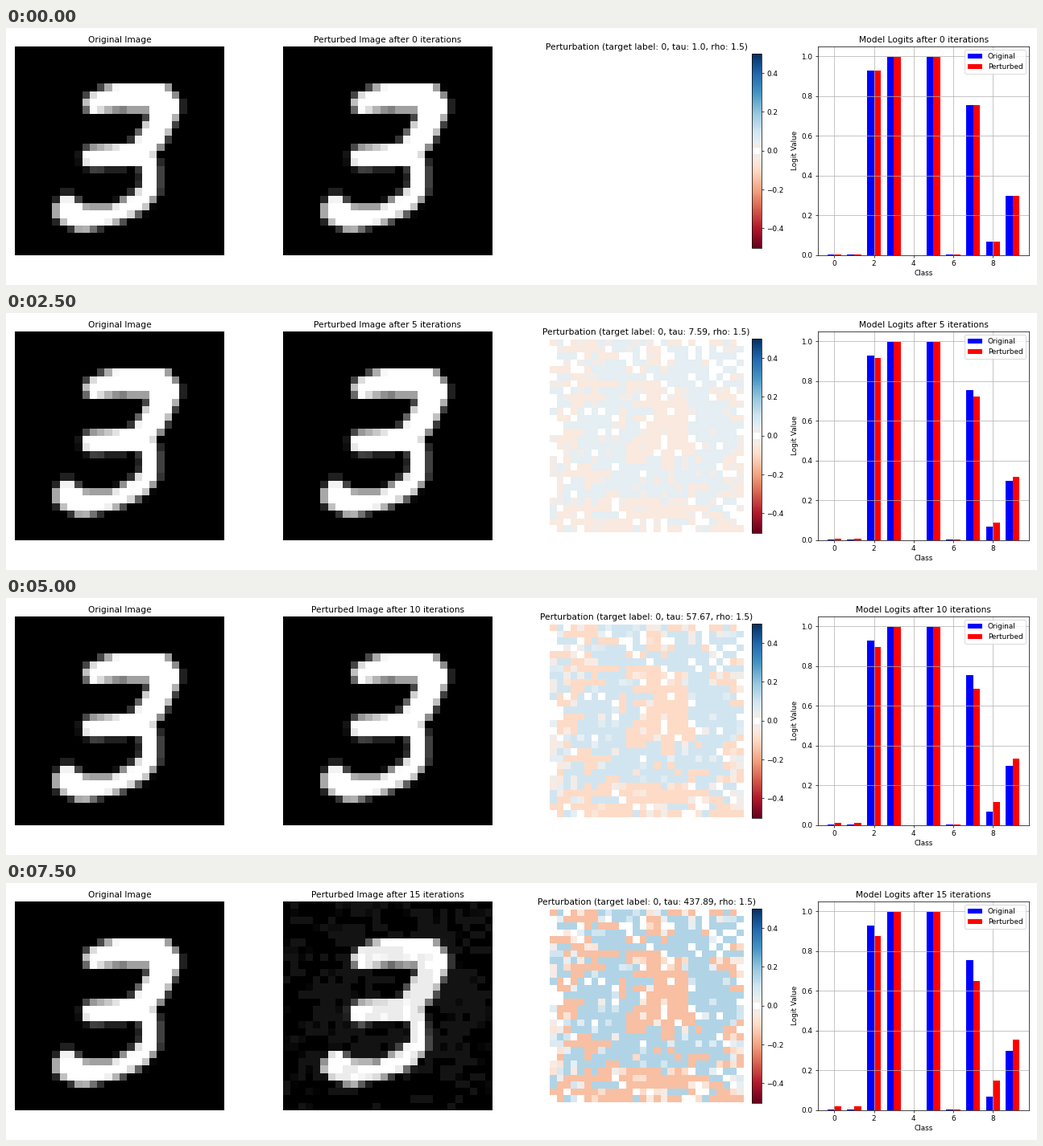
Write a matplotlib script that moves like this. It is 1280 px wide and 320 px high and loops after 8 s.

```python
import numpy as np
import matplotlib.pyplot as plt
from matplotlib.animation import FuncAnimation
from matplotlib.colors import ListedColormap

DPI = 64
STEPS, N = 16, 28
RHO, STEP = 1.5, 0.01

# Pen strokes of the digit in grid cells: x, y, pen radius
UPPER = [(10.6, 7.6, 1.4), (13.5, 6.8, 1.75), (19.5, 6.8, 1.8), (20.2, 8, 2),
         (19.6, 9.8, 1.8), (18.4, 12.1, 1.8), (16.5, 14.4, 1.6), (10.25, 14.85, 1.4)]
LOWER = [(16.9, 14.2, 1.7), (18.1, 16, 1.2), (18.1, 19.2, 1.2), (16.6, 20.8, 1.4),
         (13.4, 22.5, 1.2), (9, 23.1, 1.65), (7.1, 22, 1.85), (7, 20.9, 1.15)]

LOGITS = np.array([0.004, 0.003, 0.93, 0.998, 1e-6, 0.998, 5e-4, 0.754, 0.067, 0.299])
RATES = np.array([0.105, 0.117, -0.043, 0, 0, 0, 0.139, -0.033, 0.059, 0.017])


def draw_digit(sub=8):
    """Area coverage of the tapered pen strokes on the grid."""
    c = (np.arange(N * sub) + 0.5) / sub
    x, y = np.meshgrid(c, c)
    ink = np.zeros(x.shape, bool)
    for stroke in (UPPER, LOWER):
        for (x0, y0, r0), (x1, y1, r1) in zip(stroke, stroke[1:]):
            dx, dy = x1 - x0, y1 - y0
            t = np.clip(((x - x0) * dx + (y - y0) * dy) / (dx**2 + dy**2), 0, 1)
            ink |= np.hypot(x - x0 - t * dx, y - y0 - t * dy) < r0 + t * (r1 - r0)
    return ink.reshape(N, sub, N, sub).mean(axis=(1, 3))


def make_direction():
    """Drift of each cell: darken the middle, brighten a ring like a zero."""
    rng = np.random.default_rng(7)
    y, x = np.mgrid[:N, :N]

    def bump(cx, cy, sx, sy):
        return np.exp(-((x - cx) / sx) ** 2 - ((y - cy) / sy) ** 2)

    noise = rng.normal(size=(N, N))
    noise = sum(np.roll(noise, s, axis=1) for s in range(3)) / np.sqrt(3)
    ring = np.exp(-((np.hypot((x - 15.5) / 7.5, (y - 13) / 8) - 1) / 0.35) ** 2)
    field = (0.3 + 0.8 * noise + 1.3 * ring - 2.4 * bump(15.5, 12.5, 4, 3.5)
             - 2.6 * bump(13, 7, 6, 1.5) - 1.5 * bump(13, 25, 13, 4))

    rim = np.exp(-np.minimum(np.minimum(x, N - 1 - x), np.minimum(y, N - 1 - y) + 1) / 1.5)
    u = rng.random((N, N))
    none = 0.07 + 0.25 * rim
    weak = none + 0.1 + 0.25 * rim
    strength = np.where(u < weak, rng.uniform(0.15, 0.7, (N, N)), 1)
    return np.sign(field) * np.where(u < none, 0, strength)


def perturbation(k):
    return STEP * np.round(k * DIRECTION)


def perturbed_image(k):
    # the shift only becomes visible late in the run
    shift = perturbation(k) / 2 if k > 10 else 0
    return np.clip(DIGIT + shift, 0, 1)


def perturbed_logits(k):
    """Each class drifts evenly before the sigmoid."""
    z = np.log(LOGITS / (1 - LOGITS)) + RATES * k
    return 1 / (1 + np.exp(-z))


def make_cmap():
    v = np.linspace(-0.5, 0.5, 256)
    lut = plt.get_cmap("RdBu")(np.linspace(0, 1, 256))
    lut[np.abs(v) < 0.035, :3] = np.array([242, 236, 233]) / 255
    lut[np.abs(v) < 0.015, :3] = 1
    return ListedColormap(lut)


def show_grid(ax, data, **kw):
    ax.axis("off")
    return ax.imshow(data, interpolation="nearest", **kw)


DIGIT = draw_digit()
DIRECTION = make_direction()

fig, (ax_orig, ax_pert, ax_diff, ax_bar) = plt.subplots(
    1, 4, figsize=(20, 5), dpi=DPI, facecolor="white")

gray = dict(cmap="gray", vmin=0, vmax=1)
show_grid(ax_orig, DIGIT, **gray)
ax_orig.set_title("Original Image")

pert_im = show_grid(ax_pert, DIGIT, **gray)
pert_title = ax_pert.set_title("")

diff_im = show_grid(ax_diff, np.zeros((N, N)), cmap=make_cmap(), vmin=-0.5, vmax=0.5)
diff_title = ax_diff.set_title("")
fig.colorbar(diff_im, ax=ax_diff, fraction=0.046, pad=0.04)

classes, width = np.arange(10), 0.35
ax_bar.bar(classes - width / 2, LOGITS, width, color="blue", label="Original")
bars = ax_bar.bar(classes + width / 2, LOGITS, width, color="red", label="Perturbed")
ax_bar.set(xlabel="Class", ylabel="Logit Value", ylim=(0, 1.05))
ax_bar.grid(True)
ax_bar.legend(loc="upper right")
bar_title = ax_bar.set_title("")


def update(k):
    pert_im.set_data(perturbed_image(k))
    diff_im.set_data(perturbation(k))
    for bar, value in zip(bars, perturbed_logits(k)):
        bar.set_height(value)
    tau = round(RHO ** k, 2)
    pert_title.set_text(f"Perturbed Image after {k} iterations")
    diff_title.set_text(f"Perturbation (target label: 0, tau: {tau}, rho: {RHO})")
    bar_title.set_text(f"Model Logits after {k} iterations")
    return [pert_im, diff_im, pert_title, diff_title, bar_title, *bars]


update(0)
fig.tight_layout()

anim = FuncAnimation(fig, update, frames=STEPS, interval=500, repeat=True, repeat_delay=0)
plt.show()
```
